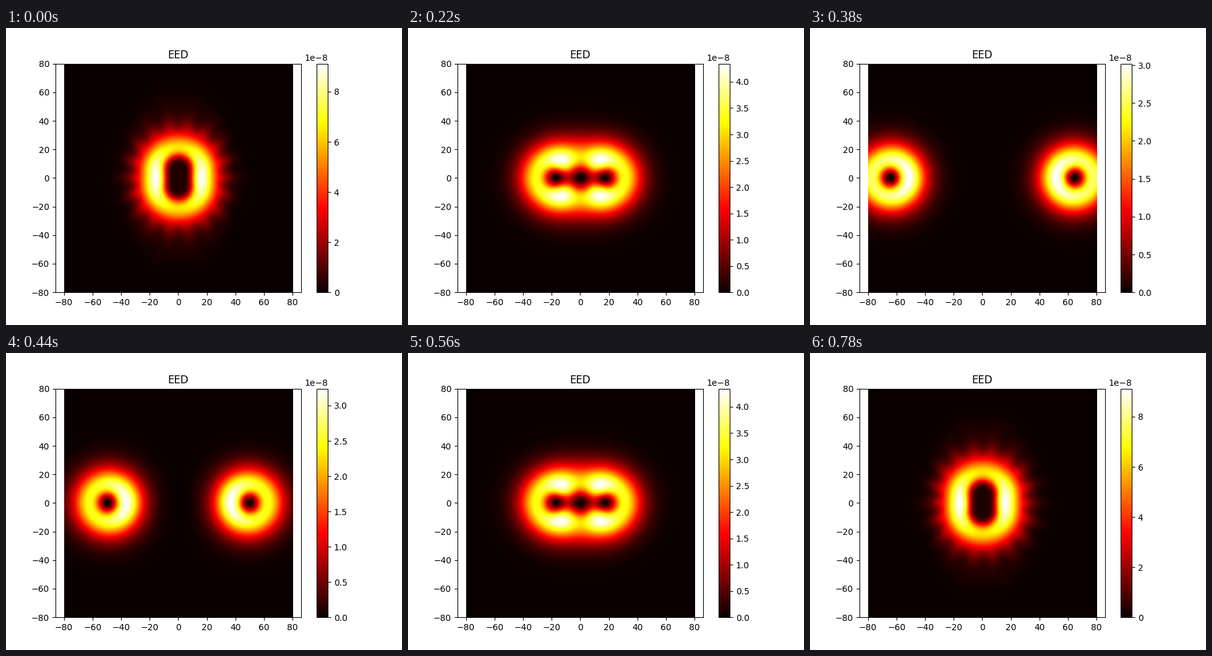
A matplotlib script for the animation above (0.8 s loop, 640 by 480 pixels).

```python
import numpy as np
import matplotlib.pyplot as plt
from matplotlib.animation import FuncAnimation

FRAMES = 40
KEYS = (0, 7, 14, 19)


def track(*values):
    """Cubic through one value per key step."""
    return np.poly1d(np.polyfit(KEYS, values, 3))


# Negative half-separation: elongated along y; positive: along x.
half_sep = track(-5.5, 7.2, 32, 64.5)
log_peak = track(*np.log([9.12, 5.57, 3.70, 3.02]))

grid = np.linspace(-80, 80, 321)
X, Y = np.meshgrid(grid, grid)
PHI = np.arctan2(Y, X)


def smoothstep(t):
    t = np.clip(t, 0, 1)
    return t * t * (3 - 2 * t)


def shorten(u, c):
    """Distance along an axis beyond a soft segment of half-length c."""
    u, c = np.abs(u), max(c, 1e-6)
    return u - c * np.tanh(u / c)


def merged_ring(c, step):
    """Single oval ring, with a ragged skirt when fully merged."""
    s = min(step / 7, 1)
    d = np.hypot(shorten(X, c), shorten(Y, -c))
    L = np.log(np.maximum(d, 1e-3) / (16 - 0.7 * s))
    ring = np.exp(-(3.1 - 0.6 * s) * L**2 - 0.9 * np.maximum(L, 0)**4)
    ring *= 1 - 0.3 * (1 - s) * np.sin(PHI)**2 - 0.06 * s * np.cos(PHI)**2

    rough = max(1 - step / 5, 0)
    if rough:
        ring *= 1 + rough * np.cos(18 * PHI) * np.clip(L - 0.5, 0, 0.45)
        ax_, ay = np.abs(X), np.abs(Y)
        octagon = np.maximum.reduce([ax_ / 37, ay / 67, (ax_ + 0.85 * ay) / 75])
        diamond = ax_ / 56 + ay / 60
        ring += rough * (0.025 * np.clip(4 * (1 - octagon), 0, 1)
                         + 0.01 * np.clip(4 * (1 - diamond), 0, 1))
    return ring


def ring_pair(c):
    """Two rings at x = -c and x = c, brighter on the facing sides."""
    boost = min(0.7 * (32 / c)**2, 0.9)
    ex = ey = 0
    for side in (-1, 1):
        dx = X - side * c
        r = np.hypot(dx, Y)
        facing = (1 - side * dx / (r + 1e-9)) / 2
        amp = np.sqrt(1 + boost * facing**2) / np.cosh(r / 16.8)**2
        ex = ex + amp * dx
        ey = ey + amp * Y
    energy = ex**2 + ey**2
    return energy / energy.max()


def density(step):
    c = half_sep(step)
    split = smoothstep((c - 7.2) / 11)
    field = 0
    if split < 1:
        ring = merged_ring(c, step)
        field = (1 - split) * ring / ring.max()
    if split > 0:
        field = field + split * ring_pair(c)
    return field / field.max()


fig, ax = plt.subplots(figsize=(6.4, 4.8), dpi=100)
im = ax.imshow(np.zeros_like(X), cmap="hot", origin="lower",
               extent=(-80, 80, -80, 80), interpolation="bilinear",
               aspect="auto", vmin=0, vmax=1e-8)
fig.colorbar(im, ax=ax)
ax.set_xlim(-85.89, 85.89)
ax.set_ylim(-80, 80)
ax.set_title("EED")


def draw(i):
    step = min(i, FRAMES - 1 - i)
    peak = np.exp(log_peak(step)) * 1e-8
    im.set_data(density(step) * peak)
    im.set_clim(0, peak)
    return (im,)


anim = FuncAnimation(fig, draw, frames=FRAMES, interval=20,
                     repeat=True, repeat_delay=0, blit=False)
plt.show()
```
